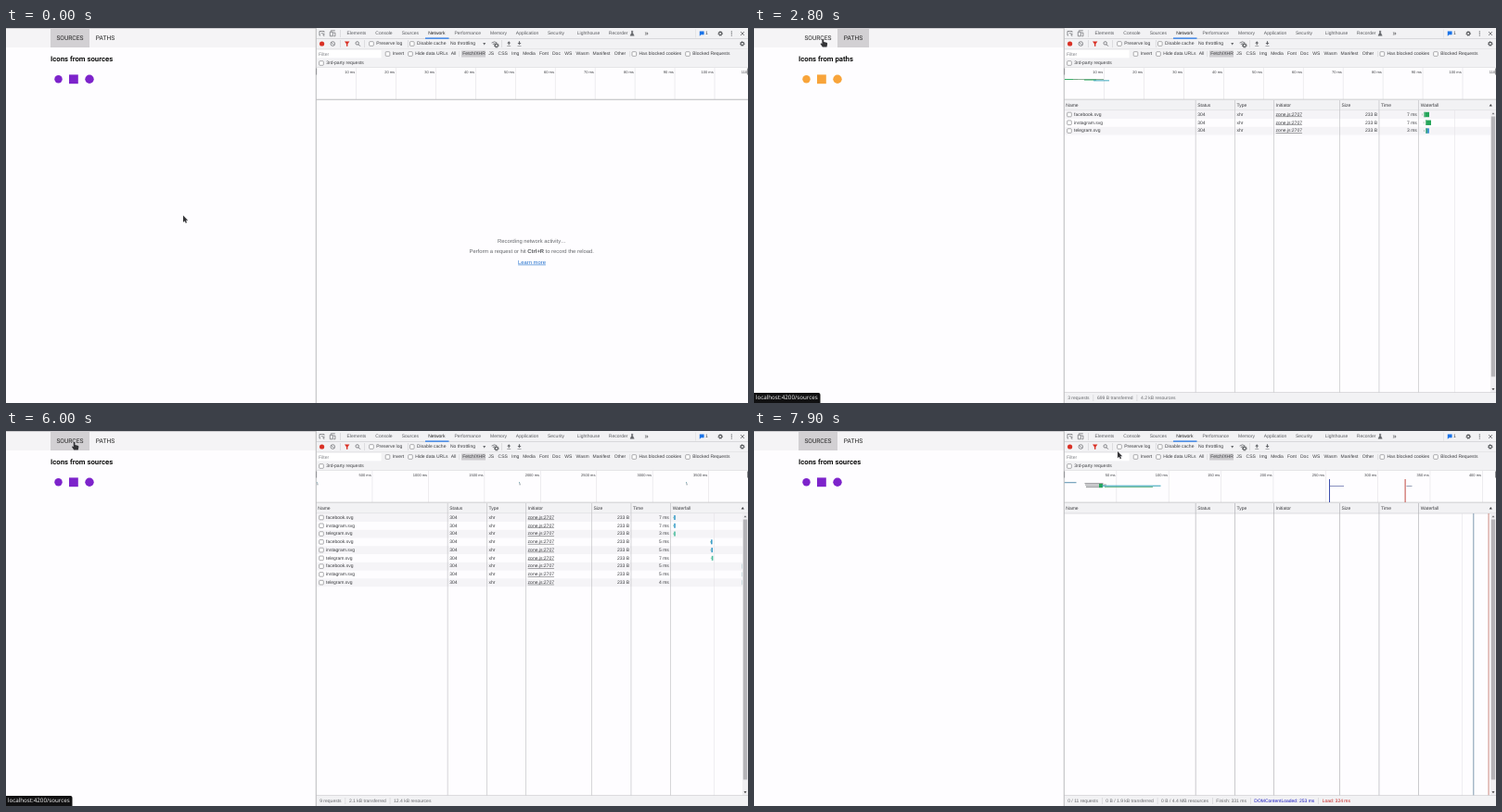
Write an HTML page with a canvas that moves like this. It is 800 px wide and 405 px high and loops after 8000 ms.

```html
<!DOCTYPE html>
<html lang="en">
<head>
<meta charset="utf-8">
<title>Icon requests</title>
<style>
html, body { margin: 0; width: 100%; height: 100%; overflow: hidden; background: #fefdff; }
canvas { display: block; }
</style>
</head>
<body>
<canvas id="stage" width="800" height="405"></canvas>
<script>
const ctx = document.getElementById('stage').getContext('2d');
const SANS = '"Liberation Sans", Arial, sans-serif';
const ROBOTO = 'Roboto, sans-serif';
const NOTO = '"Noto Sans", sans-serif';
const LOOP = 8000, STEP = 100;
const PANEL = 334.5, WHITE = '#fefdff', BAR = '#f2f2f4', INK = '#3c3d40', GREY = '#66686c', LINE = '#c9c9cc';
const BLUE = '#1a73e8', RED = '#d93025', GREEN = '#26a65b', TEAL = '#2b9fb5';

// ---------- drawing helpers ----------
function rect(x, y, w, h, color) {
  ctx.fillStyle = color;
  ctx.fillRect(x, y, w, h);
}

function text(str, x, y, { size = 5, color = INK, font = SANS, weight = 400, align = 'left' } = {}) {
  ctx.font = `${weight} ${size}px ${font}`;
  ctx.textAlign = align;
  ctx.fillStyle = color;
  ctx.fillText(str, x, y);
  return ctx.measureText(str).width;
}

function shape(d, x, y, { fill, stroke, width = 0.7, scale = 1 }) {
  const path = new Path2D(d);
  ctx.save();
  ctx.translate(x, y);
  ctx.scale(scale, scale);
  ctx.lineWidth = width;
  if (stroke) { ctx.strokeStyle = stroke; ctx.stroke(path); }
  if (fill) { ctx.fillStyle = fill; ctx.fill(path); }
  ctx.restore();
}

function disc(x, y, r, color) {
  ctx.fillStyle = color;
  ctx.beginPath();
  ctx.arc(x, y, r, 0, 7);
  ctx.fill();
}

function ring(x, y, r, color, width, dash = []) {
  ctx.strokeStyle = color;
  ctx.lineWidth = width;
  ctx.setLineDash(dash);
  ctx.beginPath();
  ctx.arc(x, y, r, 0, Math.PI * 2);
  ctx.stroke();
  ctx.setLineDash([]);
}

function gear(x, y) {
  ring(x, y, 1.6, '#55575a', 1.1);
  ring(x, y, 2.4, '#55575a', 0.8, [0.95, 0.93]);
}

function checkbox(x, y, label) {
  ctx.strokeStyle = '#77787b';
  ctx.lineWidth = 0.6;
  ctx.fillStyle = '#fff';
  ctx.beginPath();
  ctx.roundRect(x - 2.3, y - 2.3, 4.6, 4.6, 0.8);
  ctx.fill();
  ctx.stroke();
  if (label) text(label, x + 5.2, y);
}

// ---------- timeline of the recording ----------
const between = (t, ...spans) => spans.some(([a, b]) => t >= a && t < b);
const onPaths = t => between(t, [2000, 3100], [3600, 4700], [5200, 5900]);
const rowCount = t => t < 2100 ? 0 : t < 3700 ? 3 : t < 5300 ? 6 : t < 7300 ? 9 : 0;
const RELOADED = 7700;

// time, x, y of the pointer's tip; negative y is above the stage
const pointerKeys = [
  [0, 191, 202.5], [400, 611, 246], [500, 611, 246], [800, 74, 22], [900, 72, 40],
  [1000, 56, 52], [1300, 92, 55], [1500, 98, 50], [1800, 104, 22], [1900, 103.3, 15.5],
  [2400, 103.3, 15.5], [2700, 75, 12.5], [2800, 74.3, 11.8], [3100, 74.3, 11.8],
  [3500, 104, 13], [3900, 104, 13], [4200, 78.3, 9.5], [4700, 78.3, 9.5], [5000, 105, 12],
  [5400, 105, 12], [5800, 73.6, 11.8], [6000, 73.6, 11.8], [6200, 62, 7.5], [6300, 62, -20],
  [7300, 68, -20], [7400, 69, 1], [7800, 370, 18], [7900, 392, 22], [8000, 392, 22]
];

function pointerAt(t) {
  const i = pointerKeys.findIndex(k => k[0] > t);
  const [t0, x0, y0] = pointerKeys[i - 1], [t1, x1, y1] = pointerKeys[i];
  const p = (t - t0) / (t1 - t0);
  return { x: x0 + (x1 - x0) * p, y: y0 + (y1 - y0) * p };
}

function axisAt(t) {
  if (t >= RELOADED) return { unit: 50, gap: 56.35 };
  if (t >= 5300) return { unit: 500, gap: 60.45 };
  if (t >= 3700) return { unit: 200, gap: 47.25 };
  return { unit: 10, gap: 42.95 };
}

// ---------- web page on the left ----------
function drawPage(t) {
  const paths = onPaths(t);
  rect(0, 0, 334, 21, '#f5f4f6');
  rect(0, 0, 334, 0.8, '#c6c5c8');
  rect(paths ? 90 : 48, 0.5, paths ? 34 : 42, 20.5, '#d2d0d3');
  const tab = { size: 6.67, font: ROBOTO, color: '#222' };
  text('SOURCES', 54.4, 10.8, tab);
  text('PATHS', 96.8, 10.8, tab);
  text(`Icons from ${paths ? 'paths' : 'sources'}`, 48, 33.3, { size: 7.75, font: ROBOTO, weight: 700, color: '#111' });
  const color = paths ? '#f8a43a' : '#7d23cb';
  disc(56.5, 55.3, 4.2, color);
  rect(68, 50.4, 9.8, 9.8, color);
  disc(90, 55.3, 4.7, color);
}

function drawStatus(t, pointer) {
  if (t < 1900 || t >= 6700) return;
  const sources = pointer.x < 90;
  ctx.globalAlpha = t < 2000 ? 0.6 : t < 6500 ? 1 : t < 6600 ? 0.65 : 0.3;
  ctx.fillStyle = '#101011';
  ctx.beginPath();
  ctx.roundRect(0, 394, sources ? 71.5 : 65, 11, [0, 2, 0, 0]);
  ctx.fill();
  text(`localhost:4200/${sources ? 'sources' : 'paths'}`, 1.8, 399.6, { size: 6.22, font: NOTO, color: '#eee' });
  ctx.globalAlpha = 1;
}

function drawPointer({ x, y }) {
  if (y < 0) return;
  const overTab = y < 21 && x > 48 && x < 124;
  const d = overTab
    ? 'M-.9 .6Q0-.6 .9 .6V3.2L4 4Q5 4.4 4.8 5.6L4.2 8.6H-.4L-2.6 5.4Q-2.6 4.2-.9 5.2Z'
    : 'M0 0V7.2L1.7 5.7L2.8 8.2L4 7.6L2.9 5.2H5.1Z';
  shape(d, x, y, { fill: '#333336', stroke: '#e8e7ea', width: 0.8 });
}

// ---------- network panel on the right ----------
const panelTabs = [['Elements', 367.5], ['Console', 398.3], ['Sources', 426.7], ['Network', 455.2],
  ['Performance', 483.5], ['Memory', 522], ['Application', 549.8], ['Security', 584], ['Lighthouse', 615.8], ['Recorder', 649.8]];
const filters = [['All', 479.7], ['Fetch/XHR', 492.3], ['JS', 520.3], ['CSS', 530.6], ['Img', 545], ['Media', 557.2],
  ['Font', 575], ['Doc', 589], ['WS', 602.3], ['Wasm', 614.6], ['Manifest', 632.6], ['Other', 655.7]];

function drawToolbars() {
  rect(PANEL, 0, 466, 43, BAR);
  rect(PANEL, 11.4, 466, 0.6, LINE);
  rect(PANEL, 22, 466, 0.5, '#d8d8db');
  rect(PANEL, 42.6, 466, 0.5, '#d0d0d3');

  shape('M1 4.5H0V0H5V1.3M2 1.8L5.4 3.2L3.9 3.9L5.2 5.5', 338, 3.5, { stroke: GREY });
  shape('M1 1V0H5.5M0 1.5H3V6H0ZM4 6H5.6V2.3H3.8', 349.3, 2.8, { stroke: GREY });
  rect(360.3, 2, 0.5, 8, LINE);
  for (const [name, x] of panelTabs) text(name, x, 6, { color: name === 'Network' ? '#222' : '#5a5c60' });
  rect(452, 10.5, 25.5, 1.2, BLUE);
  shape('M1.2 0H3.4M1.7 0V2L.2 5H4.4L2.9 2V0', 672.8, 3.3, { fill: GREY, stroke: GREY, width: 0.5 });
  text('»', 688.5, 5.5, { size: 7.5 });
  rect(743, 1.5, 0.5, 9, '#d8d8db');
  shape('M0 0H4.8V3.8H1.6L0 5.3Z', 747.8, 3.5, { fill: BLUE });
  text('1', 754, 6);
  gear(770.2, 6);
  for (const y of [3.9, 6, 8.1]) disc(782.3, y, 0.65, GREY);
  shape('M0 0L4 4M4 0L0 4', 792, 4, { stroke: GREY, width: 0.8 });

  disc(340.6, 17, 2.6, RED);
  ring(352.3, 17, 2.3, GREY, 0.7);
  shape('M0 0L3.2 3.2', 350.7, 15.4, { stroke: GREY });
  rect(360.3, 13, 0.5, 8, LINE);
  shape('M0 0H5.4L3.4 2.7V5.2H2V2.7Z', 365, 14.6, { fill: RED });
  ring(378.7, 16.4, 1.7, GREY, 0.8);
  shape('M0 0L2 2', 379.9, 17.6, { stroke: GREY, width: 0.9 });
  rect(386.5, 13, 0.5, 8, LINE);
  checkbox(394, 17, 'Preserve log');
  rect(433, 13, 0.5, 8, LINE);
  checkbox(437.8, 17, 'Disable cache');
  text('No throttling', 479, 17);
  shape('M0 0H3L1.5 2.4Z', 514.2, 16, { fill: GREY });
  shape('M0 1.5Q3-1 6 1.5M1.2 3Q3 1.5 4.8 3M3 4.5V4', 523.6, 14.6, { stroke: GREY, width: 0.8 });
  gear(528.8, 18.8);
  rect(534.5, 13, 0.5, 8, LINE);
  shape('M2 0L4 2.2H2.6V4H1.4V2.2H0ZM0 4.7H4V5.3H0Z', 540.2, 14.3, { fill: GREY });
  shape('M2 4L4 1.8H2.6V0H1.4V1.8H0ZM0 4.7H4V5.3H0Z', 551.5, 14.3, { fill: GREY });
  gear(793.8, 17);

  rect(335.5, 24, 69, 8.3, '#fff');
  text('Filter', 337, 28.3, { color: '#808287' });
  checkbox(411.5, 28, 'Invert');
  checkbox(436, 28, 'Hide data URLs');
  rect(491, 24.5, 26, 7, '#cfced1');
  for (const [name, x] of filters) text(name, x, 28);
  for (const x of [488, 672]) rect(x, 25, 0.4, 6, LINE);
  checkbox(677.3, 28, 'Has blocked cookies');
  checkbox(735, 28, 'Blocked Requests');
  checkbox(340, 38, '3rd-party requests');
}

function drawOverview(t) {
  const { unit, gap } = axisAt(t), rows = rowCount(t);
  rect(PANEL, 43, 466, 34, WHITE);
  for (let i = 1; i < 12; i++) {
    const x = PANEL + i * gap - 0.3;
    rect(x, 43, 0.6, 34, '#e2e1e4');
    text(`${i * unit} ms`, x - 1, 47.6, { size: 4, align: 'right' });
  }
  rect(PANEL, 76.8, 466, 0.8, '#a9a9ac');
  rect(334, 43.5, 1.1, 7, '#55565a');
  rect(799, 43.5, 1, 7, '#8a8b8e');

  if (rows === 3) {
    rect(335, 55, 14, 0.9, GREEN);
    rect(344, 55, 33, 0.9, '#7fa98b');
    rect(356, 55.6, 13, 0.9, GREEN);
    rect(366, 56.4, 17, 0.9, TEAL);
  } else if (rows) {
    const marks = rows === 6 ? [335.5, 761.5] : [334.8, 553, 733];
    for (const x of marks) {
      rect(x, 55, 1, 1.6, '#8ab0b8');
      rect(x + 0.5, 56.6, 1.2, 1.8, '#9aa4ac');
    }
  } else if (t >= RELOADED) {
    rect(334.5, 55.3, 13, 0.9, '#4784a4');
    rect(356.5, 56.2, 20, 0.9, '#8d8e91');
    rect(357, 57.6, 23, 1, '#969799');
    rect(358, 59.5, 17, 1.6, '#a0a1a3');
    rect(372, 57, 4, 4.2, GREEN);
    rect(375, 58.7, 63.5, 1, TEAL);
    rect(378, 60.2, 52, 0.9, '#58b07d');
    rect(620, 52, 1, 25, '#3f4fae');
    rect(621, 59, 15, 0.9, '#7b83b8');
    rect(701.6, 52, 1, 25, '#c04a42');
    rect(703.5, 59, 6, 0.9, '#8c96b0');
  }
}

function drawEmptyMessage() {
  const style = { size: 5.83, color: GREY };
  text('Recording network activity…', 567, 230, { ...style, align: 'center' });
  let x = 499.5;
  x += text('Perform a request or hit ', x, 241.6, style);
  x += text('Ctrl+R', x, 241.6, { ...style, weight: 700, color: '#55575b' });
  text(' to record the reload.', x, 241.6, style);
  const w = text('Learn more', 567, 253.2, { ...style, color: '#2673ce', align: 'center' });
  rect(567 - w / 2, 255.6, w, 0.6, '#2673ce');
}

const columns = [['Name', 336.3], ['Status', 478.2], ['Type', 520.5], ['Initiator', 562.6],
  ['Size', 633.5], ['Time', 676], ['Waterfall', 718.7]];
const files = ['facebook.svg', 'instagram.svg', 'telegram.svg'];
const durations = [7, 7, 3, 5, 5, 7, 5, 5, 4];

function drawBar(i, rows, y) {
  const group = Math.floor(i / 3);
  if (rows === 3) {
    const x = [722.5, 724, 724.5][i];
    rect(x - 2.2, y - 1, 0.7, 2, '#a5b5aa');
    rect(x, y - 2.7, [5.5, 6, 3.5][i], 5.4, i < 2 ? GREEN : '#4597d3');
    rect(x, y - 2.7, 1.2, 5.4, i < 2 ? '#5eb883' : GREEN);
    return;
  }
  const last = group === rows / 3 - 1;
  const x = last ? 793 : group ? 760 + (i % 3) * 0.4 : 720.2;
  if (!last) rect(x - 1, y - 0.7, 1, 1.4, '#9ad0bb');
  rect(x, y - 2.5, last ? 0.7 : 1.6, 5, last ? '#bcd2d6' : i % 3 === 2 ? '#4dbd9e' : '#3f9fcb');
}

function drawTable(t, rows) {
  const reloaded = t >= RELOADED;
  rect(PANEL, 77.6, 466, 11.4, BAR);
  rect(PANEL, 88.7, 466, 0.6, LINE);
  for (let i = 0; i < rows; i += 2) rect(PANEL, 89.2 + i * 8.77, 459.5, 8.77, '#f5f4f7');
  const gridX = rows === 3 ? 755.3 : rows === 6 ? 0 : 763.2;
  if (gridX) rect(gridX, 89, 0.5, 305, '#e0dfe3');
  for (const [name, x] of columns) {
    text(name, x, 83.4);
    if (x > 340) rect(x - 2.4, 78, 0.7, 316, reloaded ? '#b4b4b8' : '#c4c4c8');
  }
  shape('M0 2.6H3.2L1.6 0Z', 792.7, 82, { fill: INK });

  for (let i = 0; i < rows; i++) {
    const y = 93.5 + i * 8.77;
    checkbox(340, y);
    text(files[i % 3], 345, y);
    text('304', 478.2, y);
    text('xhr', 520.5, y);
    const w = text('zone.js:2707', 562.6, y);
    rect(562.6, y + 2.1, w, 0.45, INK);
    text('233 B', 672, y, { align: 'right' });
    text(`${durations[i]} ms`, 714.8, y, { align: 'right' });
    drawBar(i, rows, y);
  }
  if (reloaded) {
    rect(775.3, 89, 1, 305, '#7f9ab0');
    rect(791.6, 89, 0.9, 305, '#c67a70');
  }

  rect(794, 89, 6, 305, '#f0eff2');
  rect(794.8, 95.5, 4.4, 281, '#b5b4b8');
  shape('M0 2H3L1.5 0Z', 795.5, 91.2, { fill: '#737477' });
  shape('M0 0H3L1.5 2Z', 795.5, 389.2, { fill: '#333' });
  drawSummary(rows, reloaded);
}

function drawSummary(rows, reloaded) {
  rect(PANEL, 393.6, 466, 11.4, BAR);
  rect(PANEL, 393.4, 466, 0.6, LINE);
  const totals = { 3: ['699 B', '4.2 kB'], 6: ['1.4 kB', '8.3 kB'], 9: ['2.1 kB', '12.4 kB'] };
  const [sent, size] = reloaded ? ['0 B / 1.9 kB', '0 B / 4.4 MB'] : totals[rows];
  const items = [[`${reloaded ? '0 / 11' : rows} requests`], [`${sent} transferred`], [`${size} resources`]];
  if (reloaded) items.push(['Finish: 331 ms'], ['DOMContentLoaded: 253 ms', '#1717c0'], ['Load: 324 ms', '#c41a16']);
  let x = 338.2;
  items.forEach(([label, color = GREY], i) => {
    if (i) rect(x - 4.3, 396, 0.5, 7, LINE);
    x += text(label, x, 399.7, { color }) + 8.4;
  });
}

function draw(t) {
  const rows = rowCount(t), pointer = pointerAt(t);
  ctx.textBaseline = 'middle';
  ctx.textRendering = 'geometricPrecision';
  rect(0, 0, 800, 405, WHITE);
  drawPage(t);
  drawToolbars();
  drawOverview(t);
  if (rows || t >= RELOADED) drawTable(t, rows);
  else drawEmptyMessage();
  rect(333.8, 0, 0.9, 405, '#b3b3b6');
  drawStatus(t, pointer);
  drawPointer(pointer);
}

const start = performance.now();
function tick() {
  const t = (performance.now() - start) % LOOP;
  draw(Math.floor(t / STEP) * STEP);
  requestAnimationFrame(tick);
}
tick();
</script>
</body>
</html>
```
